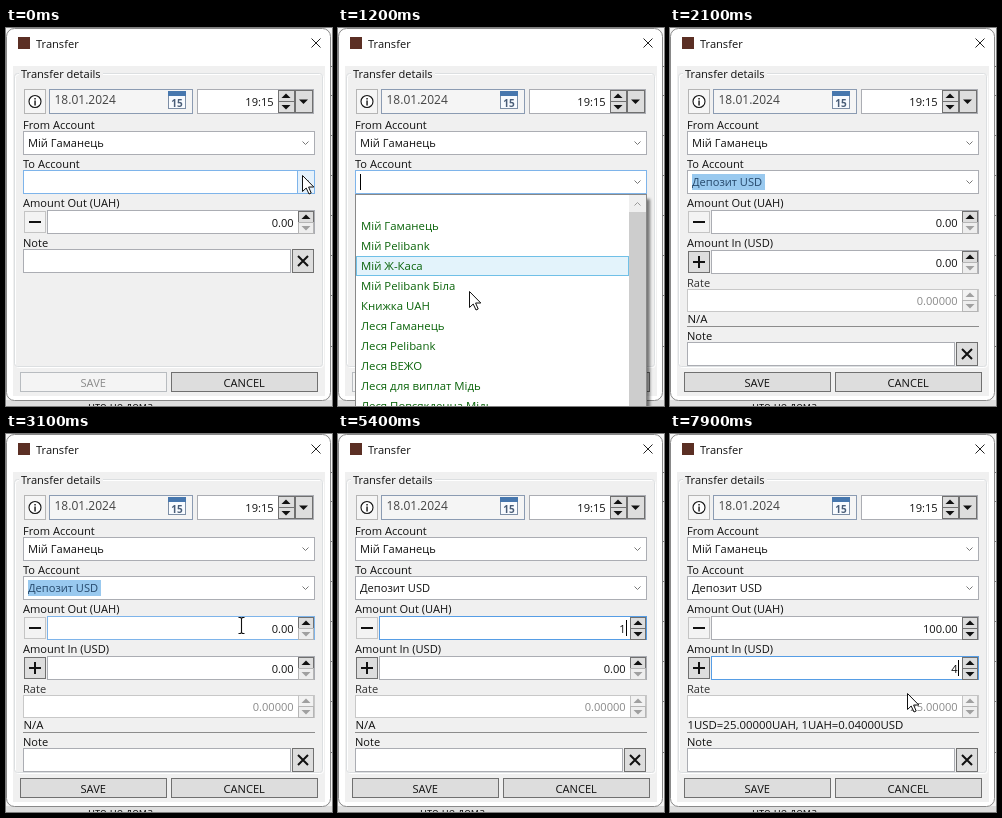
Animation of 326x378 px, one loop 8 s. Source, as an HTML page:

```html
<!DOCTYPE html>
<html lang="en">
<head>
<meta charset="utf-8">
<title>Transfer dialog</title>
<style>
html, body { margin: 0; width: 100%; height: 100%; overflow: hidden; background: #fff; }
svg { display: block; }
text { font: 11.1px "Open Sans", "Noto Sans", sans-serif; fill: #111; white-space: pre; }
.end { text-anchor: end; }
.mid { text-anchor: middle; }
.item { fill: #0a640a; }
.off { fill: #8a8a8a; }
</style>
</head>
<body>
<svg id="stage" width="326" height="378" viewBox="0 0 326 378"></svg>
<script>
const LOOP = 8000;
const OPEN = 200, PICK = 2000, FOCUS_OUT = 3900, FOCUS_IN = 6900, TYPE_IN = 7500;
const GREY = '#abadb3', HOVER = '#7eb4ea', FOCUS = '#569de5', DARK = '#707070', SELECTED = '#99c9ef';

// A bordered box whose outer edges fall on whole pixels.
const box = (x, y, w, h, fill = '#fff', stroke = GREY, extra = '') =>
  `<rect x="${x + .5}" y="${y + .5}" width="${w - 1}" height="${h - 1}" fill="${fill}" stroke="${stroke}" ${extra}/>`;
const label = (x, y, s, attrs = '') => `<text x="${x}" y="${y}" ${attrs}>${s}</text>`;
const line = (d, color, width = 1, attrs = '') =>
  `<path d="${d}" fill="none" stroke="${color}" stroke-width="${width}" ${attrs}/>`;
const group = (id, body, attrs = '') => `<g id="${id}" ${attrs}>${body}</g>`;
const chevron = (x, y, dir = 1, color = '#777') => line(`M${x - 3} ${y - 1.5 * dir}l3 ${3 * dir}l3 ${-3 * dir}`, color);
const triangle = (x, y, dir, color, id = '') =>
  `<path id="${id}" d="M${x - 4.5} ${y + 2 * dir}h9l-4.5 ${-4.5 * dir}z" fill="${color}"/>`;

function spinner(x, y, id, enabled = true) {
  return box(x, y, 16, 12, enabled ? '#ddd' : '#f2f2f2', enabled ? DARK : '#c4c4c4') +
    triangle(x + 8, y + 6, 1, enabled ? '#111' : '#a0a0a0') +
    box(x, y + 11, 16, 12, '#eee', '#b5b5b5', `id="${id}Btn"`) +
    triangle(x + 8, y + 17, -1, '#a0a0a0', id + 'Down');
}

function amount(id, y, sign) {
  const plus = sign === '+';
  return box(18, y + 1, 22, 22, plus ? '#ddd' : '#f3f3f3', plus ? DARK : '#c4c4c4') +
    line(`M23 ${y + 12}h12${plus ? `M29 ${y + 6}v12` : ''}`, '#111', 2) +
    box(41, y, 268, 24, '#fff', GREY, `id="${id}Box"`) +
    `<rect id="${id}Sel" x="265" y="${y + 4}" width="23" height="16" fill="${SELECTED}"/>` +
    label(287.7, y + 16.5, '0.00', `id="${id}Text" class="end"`) +
    `<rect id="${id}Caret" x="288" y="${y + 4}" width="1" height="16"/>` +
    spinner(292, y + 1, id);
}

function note(y) {
  return label(17, y - 3, 'Note') + box(17, y - 1, 268, 24) + box(286, y - 1, 22, 24, '#ddd', DARK) +
    line(`M292 ${y + 6}l10 10m0 -10l-10 10`, '#111', 2);
}

function combo(y, id) {
  return box(17, y, 292, 24, '#fff', GREY, `id="${id}Box"`) +
    box(291, y, 18, 24, '#e5f1fb', HOVER, `id="${id}Btn"`) + chevron(299.5, y + 12);
}

const button = (x, s, id) => box(x, 344, 147, 20, '#ddd', DARK, `id="${id}Box"`) +
  label(x + 73.2, 358.5, s, `id="${id}Text" class="mid"`);

const backdrop = '<rect width="326" height="378" fill="#f4f4f4"/>' +
  line('M0 38.5h326M0 67.5h326M0 107.5h326M0 147.5h326M0 187.5h326M0 227.5h326M0 267.5h326M0 318.5h326', '#777') +
  '<rect y="372" width="326" height="6" fill="#dedede"/>' + label(82, 381.5, 'нто не дома', 'fill="#555"');

const frame =
  '<rect x=".5" y=".5" width="324" height="372" rx="8" fill="#fff" stroke="#898989"/>' +
  '<rect x="7" y="38" width="312" height="330" fill="#f0f0f0"/>' +
  '<rect x="12" y="9" width="12" height="12" fill="#5b2f24"/>' +
  label(30, 19.5, 'Transfer') + line('M305.5 10.5l9 9m0 -9l-9 9', '#222') +
  '<rect x="9.5" y="46.5" width="308" height="293" rx="3" fill="none" stroke="#fff"/>' +
  '<rect x="8.5" y="45.5" width="308" height="293" rx="3" fill="none" stroke="#dcdfe1"/>' +
  '<rect x="13" y="43" width="84" height="6" fill="#f0f0f0"/>' + label(15, 50, 'Transfer details');

const dateRow =
  box(18, 61, 22, 25, '#f5f5f5', '#b5b5b5') +
  '<circle cx="29" cy="73.5" r="6" fill="#fff" stroke="#111" stroke-width="1.1"/>' +
  '<path d="M28.4 70h1.3v1.5h-1.3zM28.4 72.5h1.3v5h-1.3z"/>' +
  box(43, 61, 144, 25, '#f5f5f5', '#8b9bb2') +
  label(48.5, 76, '18.01.2024', 'style="font-size:12px;fill:#444"') +
  box(162, 64, 18, 17, '#f8fbff', '#7d8ea5') + '<rect x="162" y="63" width="18" height="5" fill="#4777ae"/>' +
  label(171, 79, '15', 'class="mid" style="font-size:10px;font-weight:bold;fill:#4a5e78"') +
  box(191, 61, 117, 25) + label(267.7, 77.5, '19:15', 'class="end"') +
  box(272, 62, 17, 12, '#ddd', DARK) + triangle(280, 68, 1, '#111') +
  box(272, 73, 17, 12, '#ddd', DARK) + triangle(280, 79, -1, '#111') +
  box(289, 62, 18, 23, '#ddd', DARK) + triangle(297.5, 73.5, -1, '#111');

const accounts =
  label(17, 101, 'From Account') + box(17, 103, 292, 24) + chevron(299.5, 115) + label(22, 119, 'Мій Гаманець') +
  label(17, 140, 'To Account') + combo(142, 'to') +
  '<rect id="toCaret" x="22" y="146" width="1" height="16"/>' +
  `<rect id="toSel" x="22" y="146" width="73" height="16" fill="${SELECTED}"/>` +
  label(22, 157.5, 'Депозит USD', 'id="toText"') +
  label(17, 179, 'Amount Out (UAH)') + amount('out', 182, '-');

const longForm =
  label(17, 219, 'Amount In (USD)') + amount('in', 222, '+') +
  label(17, 259, 'Rate', 'style="fill:#333"') + box(17, 261, 292, 23, '#fff', '#c8c8c8') +
  label(287.7, 276.5, '', 'id="rateText" class="end off"') + spinner(292, 261, 'rate', false) +
  label(17.5, 294.5, '', 'id="info" style="font-size:11.4px"') +
  line('M17 298.5h292', '#8c8c8c') + note(315);

const names = ['', 'Мій Гаманець', 'Мій Pelibank', 'Мій Ж-Каса', 'Мій Pelibank Біла', 'Книжка UAH',
  'Леся Гаманець', 'Леся Pelibank', 'Леся ВЕЖО', 'Леся для виплат Мідь', 'Леся Повсякденна Мідь'];
const popup =
  '<rect x="22" y="171" width="290" height="220" fill="#000" opacity=".5" filter="url(#soft)"/>' +
  box(17, 166, 292, 230, '#fff', '#888') +
  box(18, 0, 273, 20, '#e3f3fb', '#70c0e7', 'id="hover"') +
  names.map((s, i) => label(23, 182 + 20 * i, s, 'class="item" style="font-size:11.4px"')).join('') +
  '<rect x="291" y="167" width="17" height="211" fill="#cdcdcd"/>' +
  '<rect x="291" y="167" width="17" height="17" fill="#efefef"/>' + chevron(299.5, 176, -1, '#999');

const pointer =
  group('arrow', '<path d="M.5 .5V16.5L4.2 13L7 19L9.2 18L6.6 12H11.8Z" fill="#fff" stroke="#111"/>') +
  group('beam', line('M-3 -7.5h2l1 1l1 -1h2M0 -6.5v14M-3 8.5h2l1 -1l1 1h2', '#111', 1.1));

document.getElementById('stage').innerHTML =
  '<defs><filter id="soft"><feGaussianBlur stdDeviation="1.8"/></filter>' +
  '<clipPath id="reveal"><rect id="revealBox" y="166" width="326" height="0"/></clipPath></defs>' +
  backdrop + frame + dateRow + accounts + group('short', note(222)) + group('long', longForm) +
  button(14, 'SAVE', 'save') + button(165, 'CANCEL', 'cancel') +
  group('popup', popup, 'clip-path="url(#reveal)"') + group('pointer', pointer);

const el = {};
document.querySelectorAll('[id]').forEach(e => { if (e.id) el[e.id] = e; });
const show = (id, on) => { el[id].style.display = on ? '' : 'none'; };
const set = (id, name, value) => el[id].setAttribute(name, value);
const write = (id, s) => { if (el[id].textContent !== s) el[id].textContent = s; };

// Pointer path: time, x, y.
const path = [
  [700, 296, 147], [900, 272, 172], [1000, 215, 197], [1100, 165, 238], [1200, 131, 263],
  [1400, 112, 312], [1700, 105, 392], [2300, 200, 392], [2700, 238, 250], [2900, 239, 202],
  [3100, 236, 191], [3600, 236, 191], [3900, 262, 193], [6200, 262, 193], [6700, 250, 234],
  [7600, 250, 234], [7900, 237, 259]
];

function pointerAt(t) {
  const i = path.findIndex(p => p[0] > t);
  if (i === 0) return path[0].slice(1);
  if (i < 0) return path[path.length - 1].slice(1);
  const [a, b] = [path[i - 1], path[i]];
  const k = (t - a[0]) / (b[0] - a[0]);
  return [a[1] + (b[1] - a[1]) * k, a[2] + (b[2] - a[2]) * k];
}

function field(id, value, focused, typed, hovered) {
  write(id + 'Text', value);
  show(id + 'Sel', focused && !typed);
  show(id + 'Caret', focused && typed);
  set(id + 'Box', 'stroke', focused ? FOCUS : hovered ? HOVER : GREY);
  const positive = parseFloat(value) > 0;
  set(id + 'Down', 'fill', positive ? '#111' : '#a0a0a0');
  set(id + 'Btn', 'fill', positive ? '#ddd' : '#eee');
  set(id + 'Btn', 'stroke', positive ? DARK : '#b5b5b5');
}

function outValue(t) {
  if (t < 5400) return '0.00';
  if (t < 5900) return '1';
  if (t < 6000) return '10';
  return t < FOCUS_IN ? '100' : '100.00';
}

function render(t) {
  const [x, y] = pointerAt(t);
  const open = t >= OPEN && t < PICK, picked = t >= PICK, rated = t >= TYPE_IN;
  const hidden = (t >= 5400 && t < 6200) || (t >= TYPE_IN && t < 7600);
  const inField = x > 41 && x < 291;
  const overOut = inField && y >= 182 && y < 206;
  const overIn = inField && y >= 222 && y < 246;
  const overNote = inField && y >= 315 && y < 338;

  show('popup', open);
  set('revealBox', 'height', 212 * Math.min(1, Math.max(0, (t - OPEN + 50) / 150)));
  const [lagX, lagY] = pointerAt(t - 100);
  const row = Math.floor((lagY - 168) / 20);
  show('hover', lagX < 291 && row >= 0);
  set('hover', 'y', 168.5 + 20 * row);

  const overTo = x > 290 && y < 166 && t < PICK;
  set('toBox', 'stroke', overTo || open ? HOVER : GREY);
  show('toBtn', overTo);
  show('toCaret', open);
  show('toSel', picked && t < FOCUS_OUT);
  show('toText', picked);
  el.toText.style.fill = t < FOCUS_OUT ? '#25486b' : '';

  show('short', !picked);
  show('long', picked);
  set('saveBox', 'fill', picked ? '#ddd' : '#f4f4f4');
  set('saveBox', 'stroke', picked ? DARK : '#b8bcc0');
  el.saveText.style.fill = picked ? '' : '#8a8a8a';

  field('out', outValue(t), t >= FOCUS_OUT && t < FOCUS_IN, t >= 5400, picked && overOut && !hidden);
  field('in', rated ? '4' : '0.00', t >= FOCUS_IN, rated, overIn && !hidden);
  write('rateText', rated ? '25.00000' : '0.00000');
  write('info', rated ? '1USD=25.00000UAH, 1UAH=0.04000USD' : 'N/A');

  const text = picked && (overOut || overIn || overNote);
  show('pointer', !hidden);
  show('arrow', !text);
  show('beam', text);
  const snap = text ? .5 : 0;
  set('pointer', 'transform', `translate(${Math.round(x) - snap} ${Math.round(y)})`);
}

const start = performance.now();
function tick() {
  render((performance.now() - start) % LOOP);
  requestAnimationFrame(tick);
}
tick();
</script>
</body>
</html>
```
